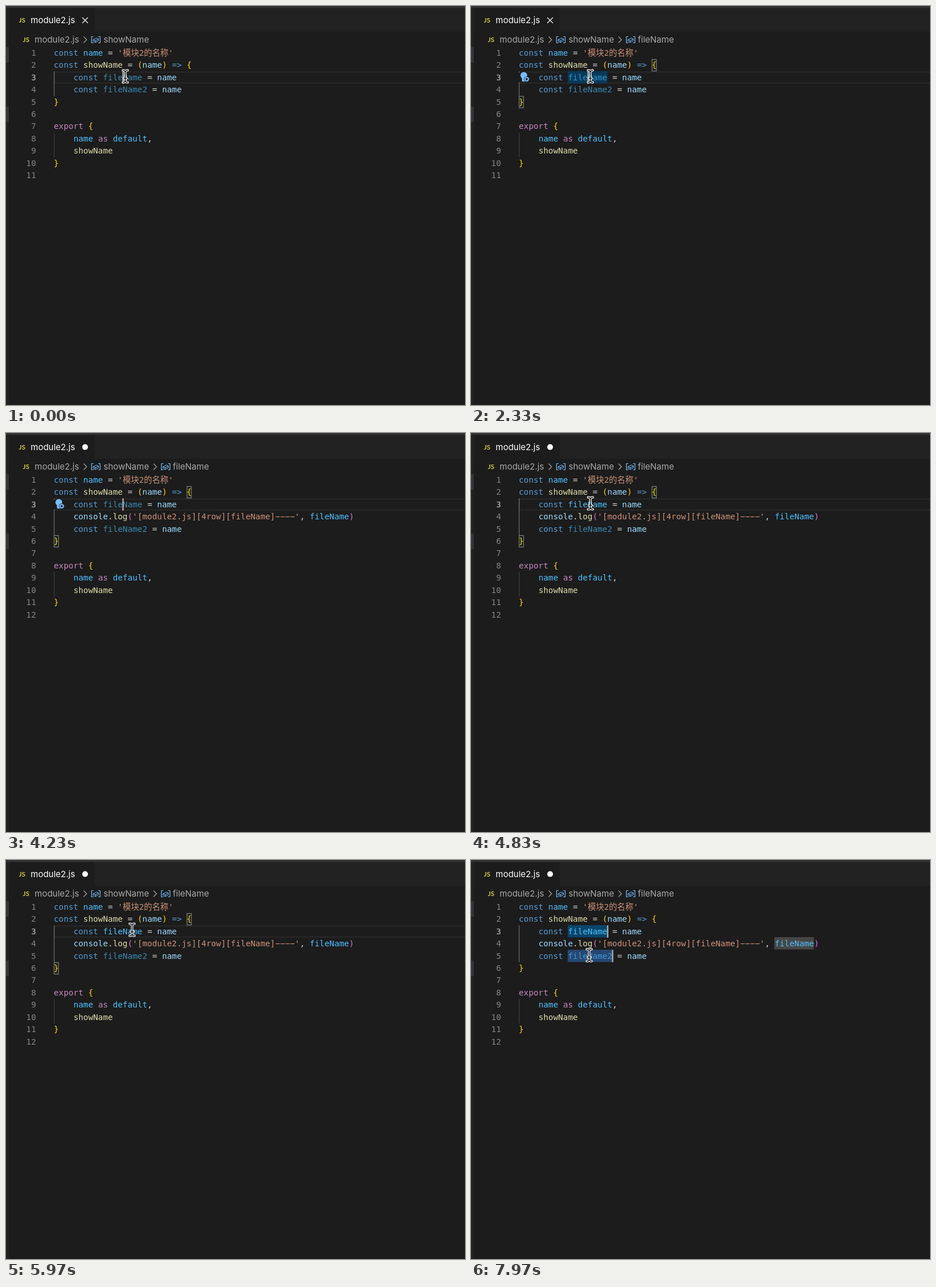
Animation, 802 px wide and 698 px high, one loop 8000 ms. Source, as an HTML page:

```html
<!DOCTYPE html>
<html lang="zh-CN">
<head>
<meta charset="utf-8">
<title>module2.js</title>
<style>
  html, body { margin: 0; width: 100%; height: 100%; overflow: hidden; background: #1c1c1c; }
  svg { display: block; width: 802px; height: 698px; }
  text { white-space: pre; }
  .code { font: 14.28px "DejaVu Sans Mono", "Noto Sans CJK SC", "Noto Sans CJK JP", "Noto Sans CJK", monospace; }
  .ui { font: 15px Inter, "Open Sans", sans-serif; }
  .badge { font: 700 11.5px Lato, "Open Sans", sans-serif; fill: #cbcb41; }
  .line { fill: none; stroke-linecap: round; stroke-linejoin: round; }
</style>
</head>
<body>
<svg id="stage" viewBox="0 0 802 698"></svg>
<script>
const LOOP = 8000, LEFT = 83.5, TOP = 71.5, CHAR = 8.6, ROW = 21.45;
const INSERT = 4100, ANALYSED = 4600, SELECT = 6450, SELECT_TWO = 7600;
const COLOR = {
  kw: '#569cd6', const: '#4fc1ff', unused: 'rgba(79, 193, 255, 0.65)', str: '#ce9178',
  fn: '#dcdcaa', brace: '#ffd700', paren: '#da70d6', param: '#9cdcfe', flow: '#c586c0', op: '#d4d4d4'
};
const stage = document.getElementById('stage');
const timed = [];

const colX = col => LEFT + col * CHAR;
const rowY = row => TOP + (row - 1) * ROW;
// Baselines sit on whole pixels
const baseline = row => Math.floor(rowY(row) + 15.7);

function add(tag, attrs, parent = stage, text) {
  const el = document.createElementNS('http://www.w3.org/2000/svg', tag);
  for (const key in attrs) el.setAttribute(key, attrs[key]);
  if (text !== undefined) el.textContent = text;
  parent.append(el);
  return el;
}

// Shows an element only while from <= time < to
function during(el, from, to = LOOP) {
  timed.push({ el, from, to });
  return el;
}

const rect = (x, y, width, height, fill, parent) =>
  add('rect', { x, y, width, height, fill }, parent);
const stroke = (d, color, width, parent) =>
  add('path', { d, class: 'line', stroke: color, 'stroke-width': width }, parent);
const label = (x, y, text, fill, parent) =>
  add('text', { x, y, fill, class: 'ui' }, parent, text);
const mark = (row, col, length, fill) =>
  rect(Math.floor(colX(col)), Math.floor(rowY(row)), length * CHAR + 0.5, ROW, fill);
const token = (row, col, text, kind, parent) =>
  add('text', { x: colX(col), y: baseline(row), fill: COLOR[kind], class: 'code' }, parent, text);

// Pairs of kind and text, laid out on the character grid
function codeLine(row, col, parts, parent) {
  for (const [kind, text] of parts) {
    if (kind) token(row, col, text, kind, parent);
    col += text.length;
  }
}

function guide(row, color, parent) {
  rect(83.6, rowY(row), 1.2, ROW, color, parent);
}

function bracketBox(row, col, from, to, parent) {
  const box = add('rect', {
    x: colX(col) + 0.6, y: rowY(row) + 0.6, width: CHAR - 1, height: ROW - 1.2,
    fill: '#1a231a', stroke: '#888', 'stroke-width': 1.1
  }, parent);
  during(box, from, to);
}

function symbolIcon(x, parent) {
  stroke(`M${x + 3.5} 53.5h-3v11h3M${x + 12.5} 53.5h3v11h-3`, '#75beff', 1.2, parent);
  stroke(`M${x + 3.5} 59l5.5 -3 3.7 1.8v3l-5.5 3 -3.7 -1.8zl3.7 1.8 5.5 -3M${x + 7.2} 60.8v3`,
    '#75beff', 1, parent);
}

const chevron = (x, parent) => stroke(`M${x} 54l5 5-5 5`, '#a5a5a5', 1.2, parent);

function drawChrome() {
  rect(0, 0, 802, 45, '#222222');
  rect(0, 0, 802, 3.5, '#343435');
  rect(6, 3.5, 149, 42, '#1c1c1c');
  rect(0, 3.5, 5, 695, '#222222');
  rect(0, 72, 5, 27, '#353539');
  rect(0, 176, 5, 27, '#353539');

  add('text', { x: 22.5, y: 28.5, class: 'badge' }, stage, 'JS');
  label(43, 30, 'module2.js', '#fff');
  during(stroke('M133.7 20.5l9 9M142.7 20.5l-9 9', '#f0f0f0', 1.3), 0, INSERT);
  during(add('circle', { cx: 138.2, cy: 24.6, r: 5, fill: '#fff' }), INSERT);

  add('text', { x: 29.5, y: 62.5, class: 'badge' }, stage, 'JS');
  label(50, 64, 'module2.js', '#a9a9a9');
  chevron(136);
  symbolIcon(149);
  label(170.5, 64, 'showName', '#a9a9a9');
  const crumb = during(add('g', {}), 200);
  chevron(258, crumb);
  symbolIcon(271, crumb);
  label(291.5, 64, 'fileName', '#a9a9a9', crumb);
}

function drawMarks() {
  const current = add('path', {
    d: `M84 ${rowY(3) + 1}H802M84 ${rowY(4) - 1}H802M84.5 ${rowY(3)}v${ROW}`,
    stroke: '#292929', 'stroke-width': 2
  });
  during(current, 0, SELECT);
  during(mark(3, 10, 8, '#07395a'), 300, INSERT);
  during(mark(3, 10, 8, '#264f78'), SELECT, SELECT + 250);
  during(mark(3, 10, 8, '#0a456b'), SELECT + 250);
  during(mark(4, 36, 8, '#32383e'), SELECT, SELECT_TWO);
  during(mark(4, 52, 8, '#32383e'), SELECT, SELECT + 250);
  during(mark(4, 52, 8, '#50565b'), SELECT + 250, SELECT_TWO);
  during(mark(4, 52, 8, '#464646'), SELECT_TWO);
  during(mark(5, 10, 8, '#32383e'), SELECT, SELECT_TWO);
  during(mark(5, 10, 9, '#264772'), SELECT_TWO);
}

// Everything below the inserted statement
function drawTail(row, from, to) {
  const tail = during(add('g', {}), from, to);
  guide(row, '#707070', tail);
  bracketBox(row + 1, 0, Math.max(from, 200), Math.min(to, SELECT), tail);
  codeLine(row, 4, [['kw', 'const'], ['', ' '], ['unused', 'fileName2'], ['', ' '], ['op', '='],
    ['', ' '], ['param', 'name']], tail);
  codeLine(row + 1, 0, [['brace', '}']], tail);
  codeLine(row + 3, 0, [['flow', 'export'], ['', ' '], ['brace', '{']], tail);
  guide(row + 4, '#404040', tail);
  guide(row + 5, '#404040', tail);
  codeLine(row + 4, 4, [['const', 'name'], ['', ' '], ['flow', 'as'], ['', ' '],
    ['const', 'default'], ['op', ',']], tail);
  codeLine(row + 5, 4, [['fn', 'showName']], tail);
  codeLine(row + 6, 0, [['brace', '}']], tail);
}

function drawCode() {
  for (let n = 1; n <= 12; n++) {
    const number = add('text', {
      x: 52.5, y: baseline(n), 'text-anchor': 'end', class: 'code',
      fill: n === 3 ? '#c6c6c6' : '#858585'
    }, stage, n);
    if (n === 12) during(number, INSERT);
  }
  bracketBox(2, 27, 200, SELECT);
  codeLine(1, 0, [['kw', 'const'], ['', ' '], ['const', 'name'], ['', ' '], ['op', '='], ['', ' '],
    ['str', "'模块2的名称'"]]);
  codeLine(2, 0, [['kw', 'const'], ['', ' '], ['fn', 'showName'], ['', ' '], ['op', '='], ['', ' '],
    ['brace', '('], ['param', 'name'], ['brace', ')'], ['', ' '], ['kw', '=>'], ['', ' '], ['brace', '{']]);

  guide(3, '#707070');
  codeLine(3, 4, [['kw', 'const'], ['', ' fileName '], ['op', '='], ['', ' '], ['param', 'name']]);
  during(token(3, 10, 'fileName', 'unused'), 0, ANALYSED);
  during(token(3, 10, 'fileName', 'const'), ANALYSED);

  const log = during(add('g', {}), INSERT);
  guide(4, '#707070', log);
  codeLine(4, 4, [['param', 'console'], ['op', '.'], ['fn', 'log'], ['paren', '('],
    ['str', "'[module2.js][4row][fileName]----'"], ['op', ','], ['', ' '],
    ['const', 'fileName'], ['paren', ')']], log);
  // Widen the hyphens to the near-joined look of the editor typeface
  add('path', {
    d: `M${colX(45) + 0.6} ${baseline(4) - 4.5}h${4 * CHAR - 1.2}`, stroke: COLOR.str,
    'stroke-width': 1.2, 'stroke-dasharray': '7.4 1.2'
  }, log);

  drawTail(4, 0, INSERT);
  drawTail(5, INSERT, LOOP);
}

function drawBulb() {
  const bulb = during(add('g', {}), 700, ANALYSED);
  rect(83, 116.5, 20, 17, '#1c1c1c', bulb);
  add('circle', { cx: 92.3, cy: 121.3, r: 5.9, fill: '#75beff' }, bulb);
  add('path', { d: 'M89 125h6.6v6l-1.2 1.2h-4.2l-1.2-1.2z', fill: '#75beff' }, bulb);
  add('circle', { cx: 97.3, cy: 128, r: 4.8, fill: '#1c1c1c' }, bulb);
  add('circle', { cx: 97.3, cy: 128, r: 2.8, fill: 'none', stroke: '#75beff', 'stroke-width': 1.8 }, bulb);
  add('circle', { cx: 97.3, cy: 128, r: 3.8, fill: 'none', stroke: '#75beff', 'stroke-width': 1.2,
    'stroke-dasharray': '1.5 1.48' }, bulb);
}

function drawPointer() {
  const pointer = add('g', {});
  const beam = 'M-4.2 -10.6Q-0.6 -10.6 0 -7.6Q0.6 -10.6 4.2 -10.6M0 -7.6V7.6'
    + 'M-4.2 10.6Q-0.6 10.6 0 7.6Q0.6 10.6 4.2 10.6M-2.4 3.6H2.4';
  stroke(beam, '#fff', 4, pointer);
  stroke(beam, '#111', 1.5, pointer);
  return pointer;
}

// time, x, y
const POINTER_PATH = [
  [0, 208.5, 123], [4800, 208.5, 123], [5200, 220.5, 122], [5900, 220.5, 122],
  [6200, 219, 122], [6900, 219, 122], [7450, 206.5, 166.5], [LOOP, 206.5, 166.5]
];

function pointerAt(t) {
  const next = POINTER_PATH.findIndex(p => p[0] > t);
  const [t0, x0, y0] = POINTER_PATH[next - 1], [t1, x1, y1] = POINTER_PATH[next];
  const k = (t - t0) / (t1 - t0), ease = k * k * (3 - 2 * k);
  return [x0 + (x1 - x0) * ease, y0 + (y1 - y0) * ease];
}

drawChrome();
drawMarks();
drawCode();
drawBulb();
const carets = add('g', {});
const caret = (row, col) => rect(colX(col) - 0.6, rowY(row), 2.3, ROW, '#aeafad', carets);
during(caret(3, 14), 0, SELECT);
during(caret(3, 18), SELECT);
during(caret(5, 19), SELECT_TWO);
const pointer = drawPointer();

// Every caret action restarts the blink
const BLINK_STARTS = [-100, INSERT, SELECT, SELECT_TWO];

function render(t) {
  for (const { el, from, to } of timed) el.style.display = t >= from && t < to ? '' : 'none';
  const start = BLINK_STARTS.filter(s => s <= t).pop();
  carets.setAttribute('visibility', (t - start) % 1000 < 500 ? 'visible' : 'hidden');
  // Typing hides the pointer until it moves again
  pointer.setAttribute('visibility', t >= INSERT && t < 4800 ? 'hidden' : 'visible');
  pointer.setAttribute('transform', `translate(${pointerAt(t).join(' ')})`);
}

const begun = performance.now();
function tick() {
  render((performance.now() - begun) % LOOP);
  requestAnimationFrame(tick);
}
tick();
</script>
</body>
</html>
```
